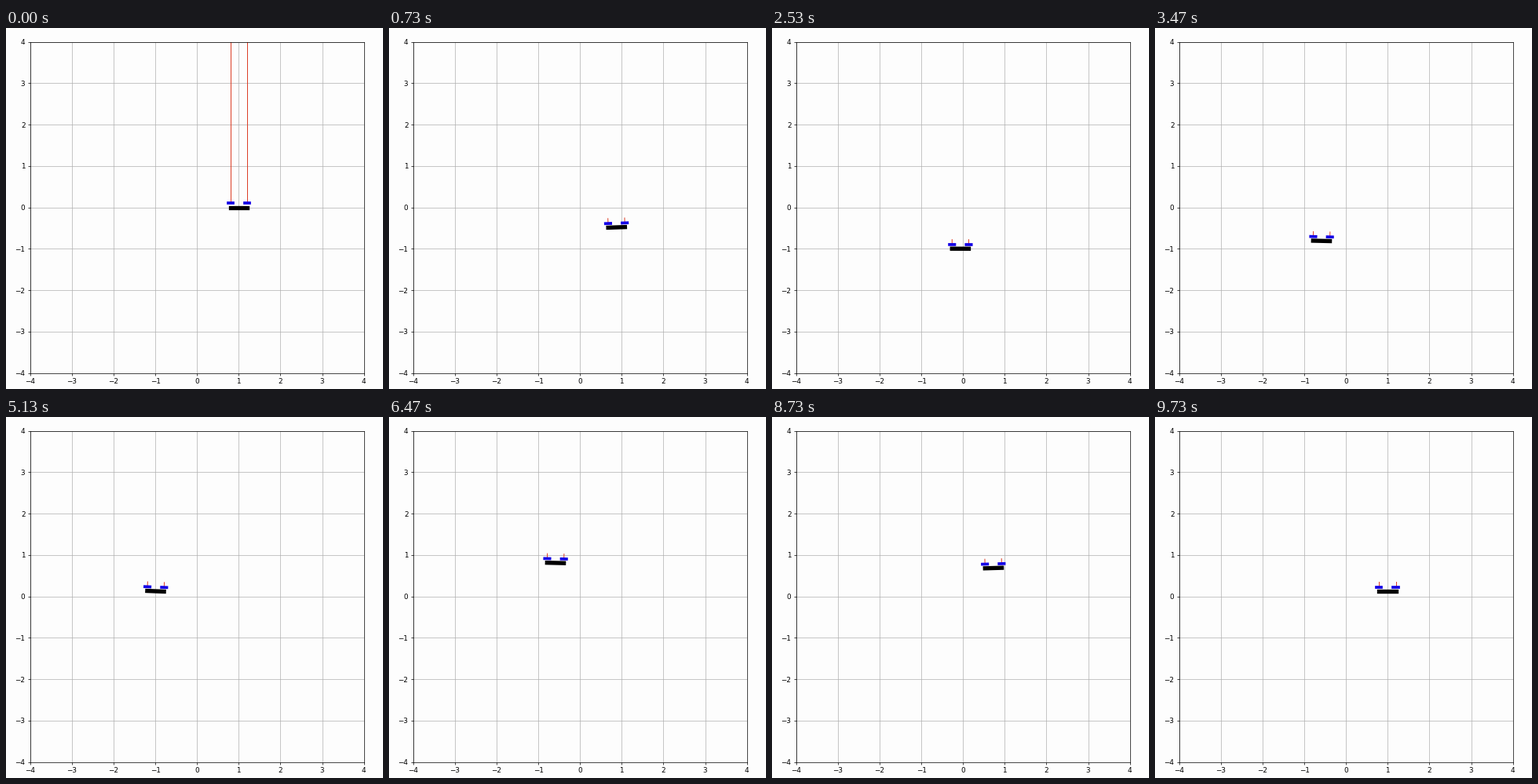
Write a matplotlib script that moves like this. It is 480 by 460 pixels and loops after 9.87 s.

```python
import numpy as np
import matplotlib.pyplot as plt
from matplotlib.animation import FuncAnimation

W, H, DPI = 480, 460, 64
LOOP, STEP = 9870, 30            # ms
TICK = 1000 / 15                 # display clock, ms
POSES, TURN = 98, np.radians(3.6)
ARM, ROTOR_Y, ROTOR_R = 0.2, 0.1, 0.06
HOVER, KICK = 0.12, 12.0         # thrust line lengths
BG = "#fdfdfd"

fig = plt.figure(figsize=(W / DPI, H / DPI), dpi=DPI, facecolor=BG)
ax = fig.add_axes([30.7 / W, 20.4 / H, 425 / W, 422 / H], facecolor=BG)
ax.set(xlim=(-4, 4), ylim=(-4, 4), xticks=range(-4, 5), yticks=range(-4, 5))
ax.grid(True)


def stroke(color, width):
    return ax.plot([], [], color=color, lw=width)[0]


thrusts = [stroke("#dc3a22", 1.1) for _ in range(2)]
body = stroke("black", 6)
rotors = [stroke("#1400e6", 4.2) for _ in range(2)]


def place(line, points, center, tilt):
    """Rotate body-frame points by tilt and move them to center."""
    c, s = np.cos(tilt), np.sin(tilt)
    x, y = np.transpose(points)
    line.set_data(center[0] + c * x - s * y, center[1] + s * x + c * y)


def pose_at(ms):
    """The craft advances two poses every three display ticks."""
    tick = int((ms + 5) / TICK)
    return min((tick + 1) * 2 // 3, POSES)


def update(i):
    k = pose_at(i * STEP + 20)
    angle = -k * TURN
    center = np.cos(angle), np.sin(angle)
    ramp = min(1, k / 3, (POSES - k) / 3)
    tilt = 0.04 * np.cos(angle) * ramp
    thrust = HOVER if k else KICK

    place(body, [(-ARM, 0), (ARM, 0)], center, tilt)
    for x, rotor, line in zip((-ARM, ARM), rotors, thrusts):
        place(rotor, [(x - ROTOR_R, ROTOR_Y), (x + ROTOR_R, ROTOR_Y)], center, tilt)
        place(line, [(x, ROTOR_Y), (x, ROTOR_Y + thrust)], center, tilt)
    return [*thrusts, body, *rotors]


anim = FuncAnimation(fig, update, frames=LOOP // STEP, interval=STEP,
                     repeat=True, repeat_delay=0)
plt.show()
```
